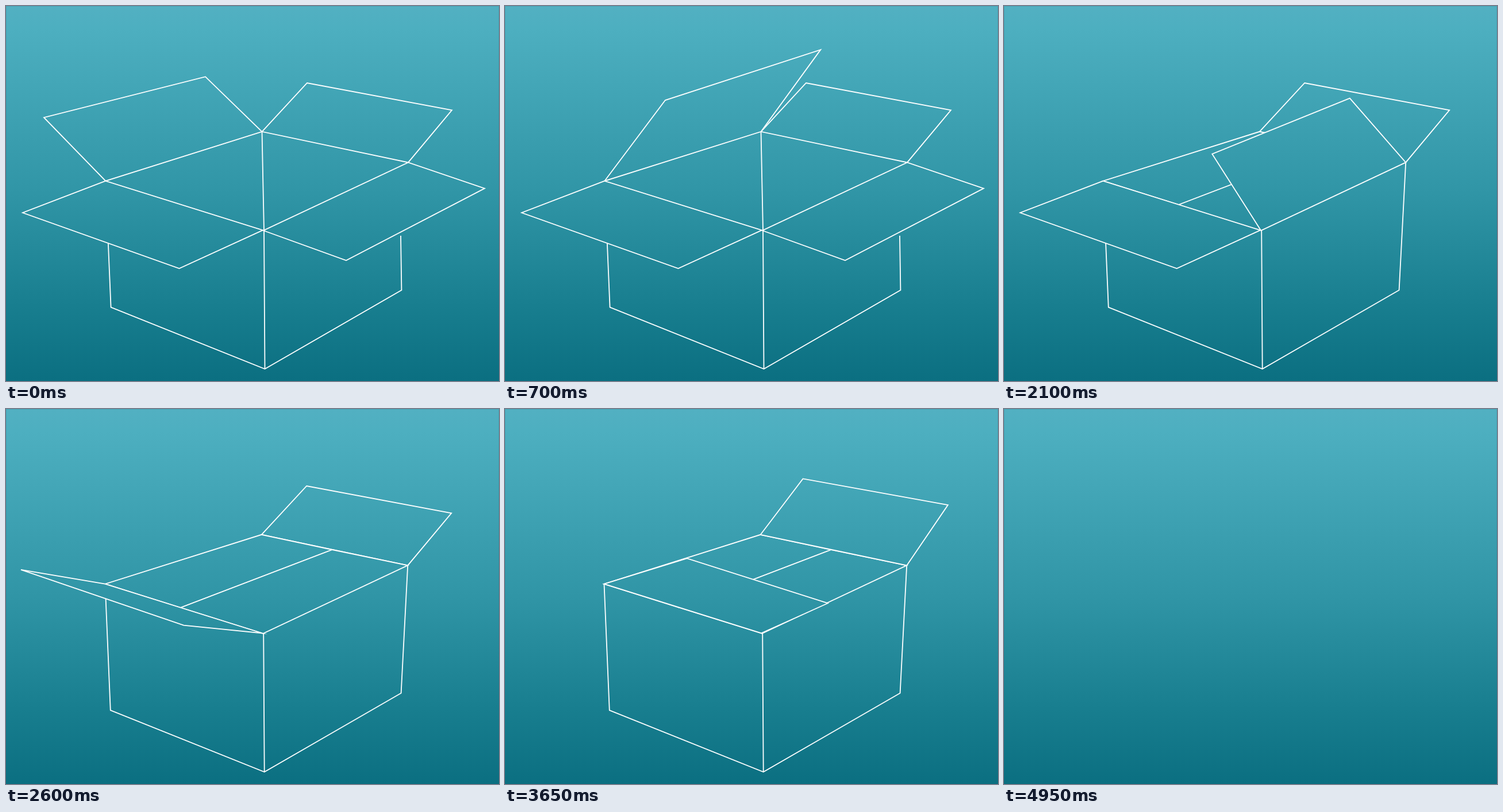
Write an HTML page with a canvas that moves like this. It is 858x653 px and loops after 5050 ms.

```html
<!DOCTYPE html>
<html lang="en">
<head>
<meta charset="utf-8">
<title>Closing box</title>
<style>
  html, body { margin: 0; width: 100%; height: 100%; overflow: hidden; }
  canvas { display: block; }
</style>
</head>
<body>
<canvas id="stage" width="858" height="653"></canvas>
<script>
const W = 858, H = 653;
const LOOP = 5050, STEP = 50, FLAP_TIME = 1200, BLANK_AT = 4950;
const ctx = document.getElementById('stage').getContext('2d');

const sky = ctx.createLinearGradient(0, 0, 0, H);
[[0, '#52b0c2'], [0.06, '#4dafc0'], [0.5, '#3095a6'], [0.8, '#187e8f'], [1, '#0b6f81']]
  .forEach(([at, color]) => sky.addColorStop(at, color));

// Rim corners, base corners and the ends of the two seams of the closed lid.
const left = [173.3, 304.7], back = [445.5, 218.8], right = [700, 272.4], front = [449, 391.4];
const baseLeft = [182.6, 524.6], baseRight = [688.4, 494.8], baseFront = [450.5, 632.1];
const rightEdgeTop = [687, 400];
const innerFront = [304.5, 346], innerBack = [568.6, 245];
const outerLeft = [317.6, 260.2], outerRight = [562.6, 338.2];

// A flap corner swings from open to closed; lift is its height when upright,
// lean makes it higher early in the swing.
const corner = (open, closed, lift, lean = [0, 0]) => ({ open, closed, lift, lean });

const flaps = [
  { hinge: [left, back], corners: [
    corner([66, 194.2], innerFront, [65, -141], [0, -21]),
    corner([347, 123.2], innerBack, [65, -139], [0, -21])] },
  { hinge: [[448, 391], right], corners: [
    corner([592, 443], innerFront, [12, -169], [-8, -17]),
    corner([833, 317.6], innerBack, [-1, -157], [4, -16])] },
  { hinge: [left, [447, 390.4]], corners: [
    corner([29, 360], outerLeft, [-43, -147]),
    corner([301.5, 457], outerRight, [-18, -145])] },
  { hinge: [back, right], corners: [
    corner([524, 134], outerLeft, [-29, -100]),
    corner([776, 181.3], outerRight, [-26, -114])] }
];

// Projected half turn around the hinge.
function swing({ open, closed, lift, lean }, turn) {
  const mix = (1 - Math.cos(turn)) / 2;
  return open.map((from, axis) => from + (closed[axis] - from) * mix
    + lift[axis] * Math.sin(turn) + lean[axis] * Math.sin(2 * turn));
}

function trace(points, closed) {
  ctx.beginPath();
  points.forEach(point => ctx.lineTo(...point));
  if (closed) {
    ctx.closePath();
    ctx.fill();
  }
  ctx.stroke();
}

function drawFlap(index, time) {
  const { hinge: [start, end], corners } = flaps[index];
  const turn = Math.PI * Math.min(1, Math.max(0, time / FLAP_TIME - index));
  trace([start, swing(corners[0], turn), swing(corners[1], turn), end], true);
}

function draw(time) {
  ctx.fillStyle = sky;
  ctx.fillRect(0, 0, W, H);
  ctx.lineWidth = 1;
  ctx.strokeStyle = 'rgba(0, 80, 100, 0.15)';
  ctx.strokeRect(0.5, 0.5, W - 1, H - 1);
  if (time >= BLANK_AT) return;

  const rightFlapMoved = time > FLAP_TIME;
  ctx.save();
  ctx.translate(rightFlapMoved ? -0.8 : 0, 0);
  ctx.lineWidth = 1.8;
  ctx.strokeStyle = '#fff';

  trace([back, front, baseFront]);
  trace([left, baseLeft, baseFront, baseRight, rightFlapMoved ? right : rightEdgeTop]);

  // The last flap lies behind the others until it starts to close.
  const order = time > 3 * FLAP_TIME ? [0, 1, 2, 3] : [3, 0, 1, 2];
  order.forEach(index => drawFlap(index, time));
  ctx.restore();
}

function tick() {
  draw(Math.floor(performance.now() % LOOP / STEP) * STEP);
  requestAnimationFrame(tick);
}
tick();
</script>
</body>
</html>
```
